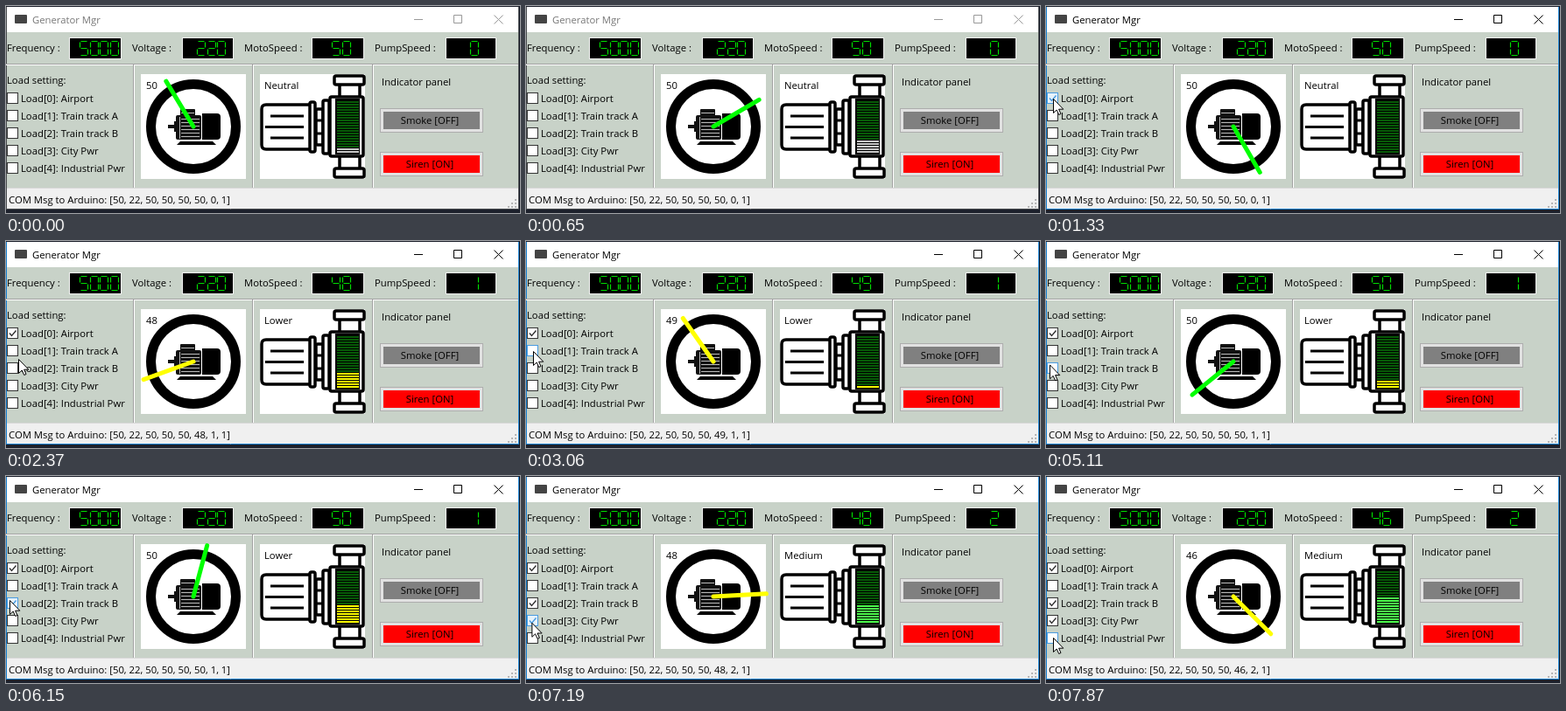
Write an HTML page that moves like this. It is 587 px wide and 237 px high and loops after 8000 ms.

```html
<!DOCTYPE html>
<html lang="en">
<head>
<meta charset="utf-8">
<title>Generator Mgr</title>
<style>
html, body { margin: 0; width: 100%; height: 100%; overflow: hidden; background: #1c202b; }
svg { display: block; }
text { font: 11.3px "Open Sans", "Noto Sans", sans-serif; fill: #000; white-space: pre; }
</style>
</head>
<body>
<svg id="stage" width="587" height="237" viewBox="0 0 587 237"></svg>
<script>
const LOOP = 8000, STEP = 344, LEAD = 50;
const GREEN = "#00dc00";

// Keys are [step, value...]
const NEEDLE = [[0, 329], [4, 510], [7, 610], [9, 685], [13, 855], [18, 1095], [23, 1215]];
const POINTER = [[4, 8, 106], [7, 14, 135], [9, 8, 126], [13, 4, 141], [18, 4, 142], [23, 8, 185]];
const SPEED = [[5, 50], [7, 48], [11, 50], [19, 50], [23, 46]];
const LOADS = [
  { name: "Airport", from: 4 }, { name: "Train track A" }, { name: "Train track B", from: 18 },
  { name: "City Pwr", from: 21 }, { name: "Industrial Pwr" }
];
const MODES = [["Neutral", "#c8c8c8"], ["Lower", "#ffff00"], ["Medium", "#4cff4c"]];

const DIGITS = ["abcdef", "bc", "abged", "abgcd", "fgbc", "afgcd", "afgedc", "abc", "abcdefg", "abcdfg"];
const SEGMENTS = {
  a: "M1.5 .5H8.5", b: "M9.5 1.5V7.5", c: "M9.5 9.5V15.5", d: "M1.5 16.5H8.5",
  e: "M.5 9.5V15.5", f: "M.5 1.5V7.5", g: "M1.5 8.5H8.5"
};

const stage = document.getElementById("stage");
const rect = (x, y, w, h, fill, more = "") =>
  `<rect x="${x}" y="${y}" width="${w}" height="${h}" fill="${fill}" ${more}/>`;
const path = (d, color, width = 1, fill = "none", more = "") =>
  `<path d="${d}" stroke="${color}" stroke-width="${width}" fill="${fill}" ${more}/>`;
const text = (x, y, s, more = "") => `<text x="${x}" y="${y}" ${more}>${s}</text>`;
const groove = (x, y, w, h) =>
  rect(x, y, w, h, "#a0a0a0") + rect(x + (h > w), y + (w > h), w, h, "#fff");
const outlined = (x, y, w, h) =>
  rect(x, y, w, h, "#fff", 'rx="2" stroke="#000" stroke-width="3.5"');

function lerp(keys, step, i = 1) {
  const n = keys.findIndex(k => k[0] >= step);
  if (n < 1) return keys[0][i];
  const a = keys[n - 1], b = keys[n];
  return a[i] + (b[i] - a[i]) * (step - a[0]) / (b[0] - a[0]);
}

function readout(label, x, boxX, w, value) {
  const digits = [...String(value)], pitch = 11.5;
  const left = Math.round(boxX + (w - pitch * digits.length) / 2 + 4.5);
  return text(x, 52, label) + rect(boxX, 36, w, 25, "#f0f0f0") + rect(boxX + 1, 37, w - 2, 23, "#000") +
    digits.map((d, i) => `<g transform="translate(${left + Math.round(i * pitch)} 40)">` +
      path([...DIGITS[d]].map(s => SEGMENTS[s]).join(""), GREEN, 1.2) + "</g>").join("");
}

function frameWindow(active) {
  const ink = active ? "#000" : "#999", edge = active ? "#1880d0" : "#4a4d50";
  let grip = "";
  for (let i = 0; i < 3; i++)
    for (let j = 0; j <= i; j++)
      grip += rect(581 - j * 4, 221 + i * 4, 2, 2, "#b5b5b5");
  return rect(0, 0, 587, 237, "#1c202b") +
    rect(0, 1, 586, 232, "#c8d2c8") + rect(0, 1, 586, 29, "#fff") +
    rect(10, 10, 14, 10, "#444", 'rx="1"') +
    text(30, 20, "Generator Mgr", `style="fill:${active ? "#000" : "#777"}"`) +
    path("M466 15.5H476M511.5 10.5H520.5V19.5H511.5ZM557.5 10.5L567.5 20.5M567.5 10.5L557.5 20.5", ink) +
    rect(0, 208, 586, 1, "#d7d7d7") + rect(0, 209, 586, 24, "#f0f0f0") + grip +
    path("M.5 1V233M585.5 1V233M0 232.5H586", edge);
}

function motor() {
  let fins = "";
  for (let y = 129; y < 152; y += 4) fins += `M200 ${y}.5H221`;
  return rect(154, 78, 120, 120, "#fff") +
    '<circle cx="214" cy="138" r="48.5" fill="none" stroke="#000" stroke-width="11"/>' +
    rect(185, 136, 8, 4, "#111") + rect(192, 132, 3, 12, "#111") +
    rect(194, 125, 29, 28, "#111", 'rx="2"') + rect(199, 118, 17, 8, "#111", 'rx="1"') +
    path(fins + "M198.5 127V152M200 122.5H215", "#bbb") +
    path("M224 123H241Q245 123 245 127V149Q245 153 241 153H224Z", "#000", 0, "#000") +
    path("M223.5 123V154", "#fff") +
    path("M199 155H236L240 159H195Z", "#000", 0, "#000");
}

function pump() {
  const flange = '<g id="flange">' +
    path("M381 90V104M404 90V104", "#000", 3.5) + outlined(375, 80, 34, 10) + "</g>";
  return rect(290, 78, 120, 120, "#fff") + flange +
    '<use href="#flange" transform="matrix(1 0 0 -1 0 276)"/>' +
    path("M347 113H297Q292 113 292 118V159Q292 164 297 164H347", "#000", 3.5) +
    path("M302 126H340M296 138.5H340M302 151H340", "#000", 3) +
    outlined(347, 110, 6, 57) + outlined(354, 118, 8, 41) + outlined(362, 108, 7, 61) +
    path("M354 131H362M354 146H362", "#000", 3) +
    outlined(370, 104, 38, 68) + rect(376, 106, 28, 64, "#000");
}

function button(y, label, fill) {
  return rect(427.5, y + .5, 117, 27, "#e1e1e1", 'stroke="#adadad"') +
    rect(431, y + 4, 110, 20, fill) + text(484, y + 18, label, 'text-anchor="middle"');
}

const panels = groove(0, 66, 585, 1) +
  [145, 281, 418].map(x => groove(x, 67, 1, 141)).join("") +
  text(1, 89, "Load setting:") + motor() + pump() +
  text(429, 91, "Indicator panel") +
  button(117, "Smoke [OFF]", "#808080") + button(167, "Siren [ON]", "#ff0000");

function loads(step, px, py) {
  return LOADS.map(({ name, from }, i) => {
    const y = 99.5 + i * 20;
    const hover = step >= 4 && px < 14 && py >= y - 1 && py <= y + 13;
    const ink = hover ? "#4a9be0" : "#333";
    return rect(1.5, y, 12, 12, hover && step === from ? "#e6f2fb" : "#fff", `stroke="${ink}"`) +
      (step >= from ? path(`M4 ${y + 6}L6.5 ${y + 9}L11.5 ${y + 3}`, ink, 1.4) : "") +
      text(17, y + 10.5, `Load[${i}]: ${name}`);
  }).join("");
}

function bars(level, color) {
  let s = "";
  for (let i = 0; i < 20; i++)
    s += rect(378, 166 - i * 3, 25, 2, i < level ? color : "#075a07");
  return s;
}

function draw(step) {
  const speed = Math.round(lerp(SPEED, step));
  const flow = Math.min(2, LOADS.filter(load => load.from < step).length);
  const level = flow ** 2 + Math.round((step + 1) % 5 * 1.5);
  const [mode, color] = MODES[flow];
  const px = lerp(POINTER, step), py = lerp(POINTER, step, 2);
  stage.innerHTML = frameWindow(step >= 4) + panels +
    readout("Frequency :", 1, 72, 60, 5000) + readout("Voltage :", 144, 201, 59, 220) +
    readout("MotoSpeed :", 272, 349, 60, speed) + readout("PumpSpeed :", 421, 502, 58, flow) +
    loads(step, px, py) + text(160, 95, speed) +
    path("M214 138V77.5", speed < 50 ? "#ffff00" : "#00ff00", 5, "none",
      `stroke-linecap="round" transform="rotate(${lerp(NEEDLE, step)} 214 138)"`) +
    text(295, 95, mode) + bars(level, color) +
    text(3, 226, `COM Msg to Arduino: [50, 22, 50, 50, 50, ${speed}, ${flow}, 1]`) +
    (step < 4 ? "" : path("M.5 .5V16.5L4.2 13L6.7 18.5L9 17.5L6.6 12.2H11.8Z", "#000", 1, "#fff",
      `transform="translate(${px} ${py})"`));
}

let shown = -1;
function tick(now) {
  const step = Math.floor((now % LOOP + LEAD) / STEP);
  if (step !== shown) draw(shown = step);
  requestAnimationFrame(tick);
}
tick(performance.now());
</script>
</body>
</html>
```
